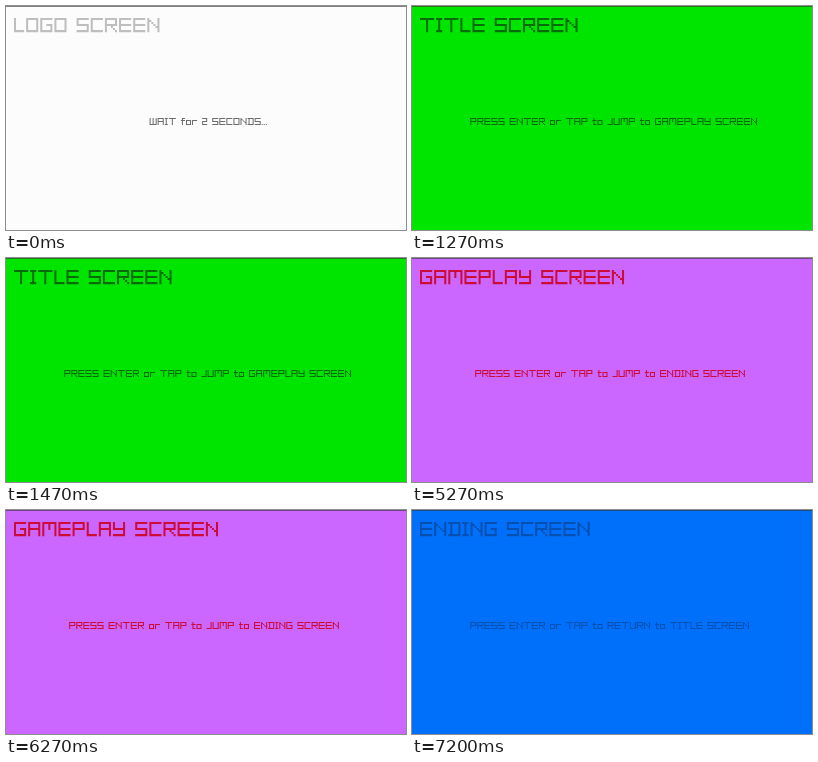
An HTML page with a canvas for the animation above (9.6 s loop, 400x224 px).

```html
<!DOCTYPE html>
<html lang="en">
<head>
<meta charset="utf-8">
<title>Screens</title>
<style>
  html, body { margin: 0; width: 100%; height: 100%; overflow: hidden; }
  canvas { display: block; width: 400px; height: 224px; }
</style>
</head>
<body>
<canvas id="stage" width="400" height="224" role="img"></canvas>
<script>
const LOOP = 9600;
const UNIT = 1.01; // size of one font cell in the small text
const SCREENS = [
  { at: 0, bg: '#fdfcfd', title: 'LOGO SCREEN', ink: '#bebebe',
    note: 'WAIT for 2 SECONDS...', noteInk: '#6c6c6c', x: 143.6 },
  { at: 1130, bg: '#00e500', title: 'TITLE SCREEN', ink: '#056c08',
    note: 'PRESS ENTER or TAP to JUMP to GAMEPLAY SCREEN', x: 58.2 },
  { at: 3600, bg: '#cb66ff', title: 'GAMEPLAY SCREEN', ink: '#cc0c38',
    note: 'PRESS ENTER or TAP to JUMP to ENDING SCREEN', x: 63.2 },
  { at: 6330, bg: '#0070fb', title: 'ENDING SCREEN', ink: '#0650b0',
    note: 'PRESS ENTER or TAP to RETURN to TITLE SCREEN', x: 58.2 }
];

// Square letters, seven cells tall, built from named strokes.
const GLYPHS = {
  A: 'tlLmrR', C: 'tlLb', D: 'tibrR', E: 'tlLmb', G: 'tlLbRg', I: 'tcb',
  J: 'rRb', L: 'lLb', M: 'tlLrRC', N: 'lLrRd', O: 'tlLrRb', P: 'tlLmr',
  R: 'tlLmrk', S: 'tlmRb', T: 'tc', U: 'lLrRb', W: 'lLrRbc', Y: 'lmrRb',
  f: 'iTx', o: 'xLRb', r: 'xL', t: 'ixB', 2: 'trmLb', '.': 'b', ' ': ''
};
const WIDTHS = { ' ': 3, '.': 1, I: 3, f: 4, t: 4, J: 5, L: 5, o: 5, r: 5, 2: 5, M: 7, T: 7, W: 7 };
const widthOf = ch => WIDTHS[ch] || 6;

const diagonal = (x, y, n) => Array.from({ length: n }, (_, i) => [x + i, y + i, 1, 1]);
const STROKES = {
  t: w => [[0, 0, w, 1]],
  T: w => [[1, 0, w - 1, 1]],
  x: w => [[0, 2, w, 1]],
  m: w => [[0, 3, w, 1]],
  g: w => [[w - 3, 3, 3, 1]],
  b: w => [[0, 6, w, 1]],
  B: w => [[1, 6, w - 1, 1]],
  l: () => [[0, 0, 1, 4]],
  L: () => [[0, 3, 1, 4]],
  r: w => [[w - 1, 0, 1, 4]],
  R: w => [[w - 1, 3, 1, 4]],
  i: () => [[1, 0, 1, 7]],
  c: w => [[(w - 1) / 2, 0, 1, 7]],
  C: w => [[(w - 1) / 2, 0, 1, 4]],
  d: () => diagonal(1, 1, 4),
  k: w => diagonal(w - 3, 4, 3)
};

const canvas = document.getElementById('stage');
const ctx = canvas.getContext('2d');

function drawText(text, x, y, size, color) {
  ctx.fillStyle = color;
  ctx.beginPath();
  for (const ch of text) {
    const w = widthOf(ch);
    for (const name of GLYPHS[ch]) {
      for (const [cx, cy, cw, chh] of STROKES[name](w)) {
        ctx.rect(x + cx * size, y + cy * size, cw * size, chh * size);
      }
    }
    x += (w + 1) * size;
  }
  ctx.fill();
}

function drawScreen(s) {
  ctx.fillStyle = s.bg;
  ctx.fillRect(0, 0, 400, 224);
  ctx.fillStyle = 'rgba(50, 50, 50, 0.6)';
  ctx.fillRect(0, 0, 400, 1);
  drawText(s.title, 8, 12, UNIT * 2, s.ink);
  drawText(s.note, s.x, 112, UNIT, s.noteInk || s.ink);
  canvas.setAttribute('aria-label', s.title + ': ' + s.note);
}

const start = performance.now();
let shown = null;

function tick() {
  const t = (performance.now() - start) % LOOP;
  const next = SCREENS.filter(s => s.at <= t).pop();
  if (next !== shown) drawScreen(shown = next);
  requestAnimationFrame(tick);
}
tick();
</script>
</body>
</html>
```
